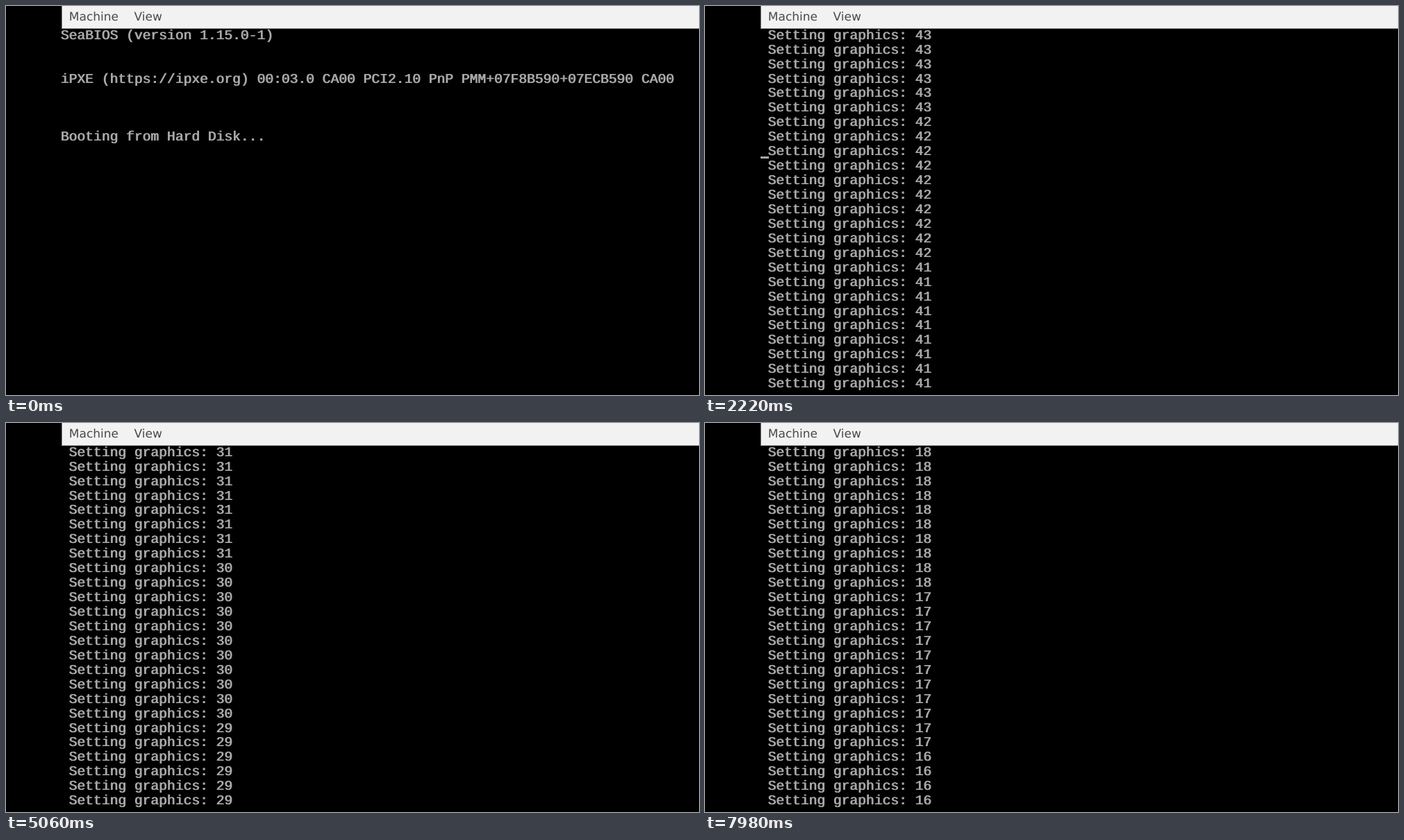
Write an HTML page that moves like this. It is 998 by 561 pixels and loops after 8 s.

```html
<!DOCTYPE html>
<html lang="en">
<head>
<meta charset="utf-8">
<title>Boot screen</title>
<style>
  html, body { margin: 0; width: 100%; height: 100%; overflow: hidden; background: #000; }
  body { position: relative; text-rendering: geometricPrecision; }
  .menu, #screen, #cursor { position: absolute; margin: 0; }
  .menu {
    left: 80px; top: 0; right: 0; height: 32px;
    border: solid #8a8a88; border-width: 0 0 1px 1px;
    background: #f3f2f3; color: #4a4a4a;
    font: 17px/33px "DejaVu Sans", sans-serif;
  }
  .menu span { position: absolute; top: 0; }
  /* The sideways shadow gives heavy stems and thin bars, like a text-mode font. */
  #screen {
    left: 78.5px; top: 32.7px; color: #a8a8a8; text-shadow: 1px 0 #a8a8a8;
    font: 19.635px/20.94px "Liberation Mono", monospace;
  }
  #cursor { left: 80px; top: 217px; width: 12px; height: 2.6px; background: #a8a8a8; }
</style>
</head>
<body>
<div class="menu">
  <span style="left:9.8px">Machine</span>
  <span style="left:103.6px">View</span>
</div>
<pre id="screen"></pre>
<div id="cursor"></div>
<script>
const LOOP = 8000, ROWS = 25, BLINK = 11.43;
const screenText = document.getElementById("screen");
const cursor = document.getElementById("cursor");

const bootText = [
  "SeaBIOS (version 1.15.0-1)", "", "",
  "iPXE (https://ipxe.org) 00:03.0 CA00 PCI2.10 PnP PMM+07F8B590+07ECB590 CA00",
  "", "", "", "Booting from Hard Disk..."
].join("\n");

// [tick, lines printed so far]
const progress = [[2.7, 0], [17, 30], [47, 93], [83, 171], [109, 217], [134, 267], [171, 352]];

// Three ticks per 140 ms, lasting 20, 20 and 100 ms.
function tickAt(ms) {
  const shifted = ms + 20, rest = shifted % 140;
  return 3 * Math.floor(shifted / 140) + (rest < 20 ? 0 : rest < 40 ? 1 : 2) - 1;
}

function linesAt(tick) {
  if (tick <= progress[0][0]) return 0;
  const next = progress.findIndex(([at]) => tick <= at);
  const [t0, n0] = progress[next - 1], [t1, n1] = progress[next];
  return Math.round(n0 + (n1 - n0) * (tick - t0) / (t1 - t0));
}

// The countdown drops by one every 10.54 lines on average.
const countdown = line => 50 - Math.ceil((line + 0.39) / 10.54);

function render(ms) {
  const tick = tickAt(ms), printed = linesAt(tick);
  const rows = [];
  for (let line = Math.max(0, printed - ROWS); line < printed; line++) {
    rows.push(" Setting graphics: " + countdown(line));
  }
  const text = printed ? rows.join("\n") : bootText;
  if (screenText.textContent !== text) screenText.textContent = text;
  const phase = (tick - 0.2 + BLINK) % BLINK;
  cursor.style.visibility = phase < BLINK / 2 ? "visible" : "hidden";
}

function loop() {
  render(Math.floor(performance.now() % LOOP));
  requestAnimationFrame(loop);
}
render(0);
requestAnimationFrame(loop);
</script>
</body>
</html>
```
